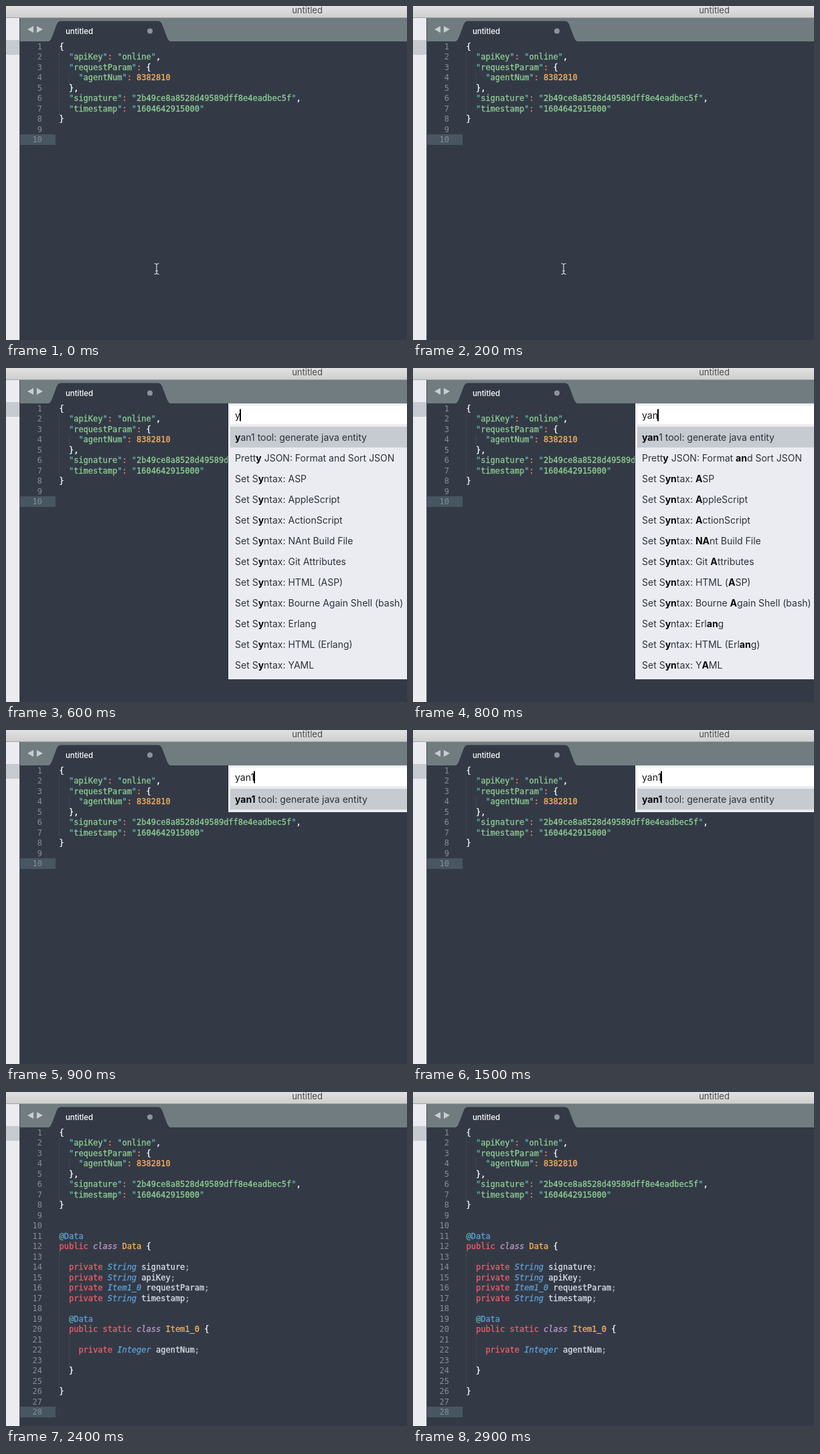
An HTML page with a canvas for the animation above (3 s loop, 599 px wide and 500 px high).

```html
<!DOCTYPE html>
<html lang="en">
<head>
<meta charset="utf-8">
<title>Editor</title>
<style>
  html, body { margin: 0; width: 100%; height: 100%; overflow: hidden; background: #333a46; }
  canvas { display: block; }
</style>
</head>
<body>
<canvas id="stage" width="599" height="500"></canvas>
<script>
const ctx = document.getElementById('stage').getContext('2d');

const LOOP = 3000, STEP = 100;
const OPEN_AT = 300, RESULT_AT = 1700;
const TYPING = [[600, 'y'], [700, 'ya'], [800, 'yan'], [900, 'yan1']];
const POINTER = { start: 1800, end: 2200, path: [[225, 393.5], [554, 459], [534, 497]] };

const CODE_SIZE = 12, CODE_X = 79.5, LINE_H = 15.5, FIRST_LINE = 61;
const MONO = '"DejaVu Sans Mono", monospace';
const SANS = 'Inter, sans-serif';
const ROW_H = 31, LIST_X = 342;

const C = {
  editor: '#333a46', side: '#ebecf1', selected: '#c6cad1', tabs: '#707c80',
  gutter: '#475661', number: '#868d97', guide: '#4b5460', text: '#dce1e9',
  white: '#ffffff', green: '#8fce94', teal: '#5fb4b4', coral: '#f0785c',
  orange: '#f9ae58', red: '#ef5c68', blue: '#5f9fd6', purple: '#c695c6', punct: '#a6acb9'
};

const json = `{
  "apiKey": "online",
  "requestParam": {
    "agentNum": 8382810
  },
  "signature": "2b49ce8a8528d49589dff8e4eadbec5f",
  "timestamp": "1604642915000"
}

`.split('\n');

const java = `@Data
public class Data {

  private String signature;
  private String apiKey;
  private Item1_0 requestParam;
  private String timestamp;

  @Data
  public static class Item1_0 {

    private Integer agentNum;

  }

}

`.split('\n');

const fullDoc = [...json, ...java];

const commands = ['About', 'Anaconda: Vagrant Enable', 'Anaconda: Vagrant Init',
  'Anaconda: Vagrant Reload', 'Anaconda: Vagrant Status', 'Anaconda: Vagrant Up',
  'Arithmetic', 'Bookmarks: Clear All', 'Bookmarks: Select All',
  'Bookmarks: Select Next', 'Bookmarks: Select Previous', 'Bookmarks: Toggle'];

// Asterisks enclose the letters that can match the query.
const matches = ['*yan1* tool: generate java entity', 'Prett*y* JSON: Format *an*d Sort JSON',
  ...['*A*SP', '*A*ppleScript', '*A*ctionScript', '*NA*nt Build File', 'Git *A*ttributes',
    'HTML (*A*SP)', 'Bourne *A*gain Shell (bash)', 'Erl*an*g', 'HTML (Erl*an*g)', 'Y*A*ML']
    .map(name => `Set S${name.includes('*an*') ? '*y*n' : '*yn*'}tax: ${name}`)];

const syntax = [
  [/\w+(?=")/y, C.green], [/"/y, C.teal], [/:/y, C.coral], [/\d+/y, C.orange],
  [/(Data|Item1_0)(?= \{)/y, C.orange], [/@/y, C.teal], [/Data/y, C.blue],
  [/String|Integer|Item1_0/y, C.blue, true], [/class/y, C.purple, true],
  [/private|public|static/y, C.red], [/;/y, C.punct], [/[{},]/y, C.white],
  [/\w+|./y, C.text]
];

function rect(x, y, w, h, color) {
  ctx.fillStyle = color;
  ctx.fillRect(x, y, w, h);
}

function shape(points, color) {
  ctx.fillStyle = color;
  ctx.beginPath();
  points.forEach(([x, y]) => ctx.lineTo(x, y));
  ctx.fill();
}

function label(str, x, y, font, color, align = 'left') {
  ctx.font = font;
  ctx.textAlign = align;
  ctx.fillStyle = color;
  ctx.fillText(str, x, y);
}

const lineY = n => FIRST_LINE + (n - 1) * LINE_H;

function codeLine(str, baseline) {
  ctx.font = `${CODE_SIZE}px ${MONO}`;
  ctx.lineWidth = 0.3;
  const charW = ctx.measureText('0').width;
  for (let i = 0; i < str.length;) {
    for (const [pattern, color, italic] of syntax) {
      pattern.lastIndex = i;
      const hit = pattern.exec(str);
      if (!hit) continue;
      const x = CODE_X + i * charW;
      label(hit[0], x, baseline, `${italic ? 'italic ' : ''}${CODE_SIZE}px ${MONO}`, color);
      ctx.strokeStyle = color;
      ctx.strokeText(hit[0], x, baseline);
      i += hit[0].length;
      break;
    }
  }
}

function guide(x, from, to) {
  const bottom = lineY(to) + LINE_H / 2;
  for (let y = Math.round(lineY(from) - LINE_H / 2); y < bottom; y += 2) rect(x, y, 1, 1, C.guide);
}

function drawWindow() {
  rect(0, 0, 599, 500, C.editor);
  rect(0, 17, 20, 483, C.side);
  rect(0, 51, 20, 22, C.selected);
  rect(20, 17, 1, 483, '#4c525c');

  const bar = ctx.createLinearGradient(0, 0, 0, 17);
  bar.addColorStop(0, '#e2e1e2');
  bar.addColorStop(1, '#d0cfd0');
  rect(0, 0, 599, 17, bar);
  label('untitled', 450, 11, `13px ${SANS}`, '#4a4a4b', 'center');

  rect(21, 17, 578, 36, C.tabs);
  rect(0, 17, 599, 1, '#a0a4a5');
  ctx.fillStyle = C.editor;
  ctx.beginPath();
  ctx.moveTo(64, 53);
  ctx.quadraticCurveTo(67, 51, 68.5, 47);
  ctx.lineTo(76, 27);
  ctx.quadraticCurveTo(78, 22.5, 82, 22.5);
  ctx.lineTo(227, 22.5);
  ctx.quadraticCurveTo(231, 22.5, 233, 27);
  ctx.lineTo(240.5, 47);
  ctx.quadraticCurveTo(242, 51, 245, 53);
  ctx.fill();
  shape([[32, 35], [41, 30], [41, 40]], '#c8cdcf');
  shape([[55, 35], [46, 30], [46, 40]], '#c8cdcf');
  label('untitled', 89, 41.5, `500 11.4px ${SANS}`, C.white);
  ctx.fillStyle = '#8d939b';
  ctx.beginPath();
  ctx.arc(215, 37.5, 4, 0, Math.PI * 2);
  ctx.fill();
}

function drawDocument(t) {
  const done = t >= RESULT_AT;
  const lines = done ? fullDoc : json;
  const last = lines.length;
  const lastTop = Math.floor(lineY(last) - 8);
  rect(21, lastTop, 53, 16, C.gutter);
  guide(79, 2, 7);
  guide(94, 4, 4);
  if (done) {
    guide(79, 13, 25);
    guide(94, 21, 23);
    const pulse = Math.sin(Math.PI * (t - RESULT_AT) / 600) ** 2;
    ctx.globalAlpha = 0.22 * pulse;
    rect(79, lastTop, 1, 16, C.white);
    ctx.globalAlpha = 1;
  }
  lines.forEach((str, i) => {
    const baseline = Math.floor(lineY(i + 1) + 4.4);
    label(i + 1, 54, baseline, `${CODE_SIZE}px ${MONO}`, C.number, 'right');
    codeLine(str, baseline);
  });
}

function listText(str, baseline, query) {
  let x = LIST_X, marked = false;
  const runs = [];
  for (const ch of str) {
    if (ch === '*') { marked = !marked; continue; }
    const bold = marked && query.includes(ch.toLowerCase());
    const run = runs[runs.length - 1];
    if (run && run.bold === bold) run.text += ch;
    else runs.push({ text: ch, bold });
  }
  for (const { text, bold } of runs) {
    label(text, x, baseline, `${bold ? 700 : 400} 14px ${SANS}`, bold ? '#08090b' : '#2c323c');
    x += ctx.measureText(text).width;
  }
}

function drawPalette(query) {
  const rows = !query ? commands : query === 'yan1' ? matches.slice(0, 1) : matches;
  const height = rows.length > 1 ? 413 : 70;
  rect(331, 53, 1, height, '#22272f');
  rect(332, 53, 267, height, C.side);
  rect(335, 56, 264, 28, C.white);
  rect(335, 88, 264, ROW_H, C.selected);

  label(query, LIST_X, 75.5, `14px ${SANS}`, '#15171a');
  const caretX = query ? Math.round(LIST_X + ctx.measureText(query).width) - 1 : 341;
  rows.forEach((row, i) => listText(row, 108.5 + i * ROW_H, query));
  rect(caretX, 61.5, 2, 18, '#000');
}

function drawPointer(x, y) {
  ctx.strokeStyle = '#d3d7dc';
  ctx.lineWidth = 1.2;
  ctx.beginPath();
  for (const s of [-1, 1]) {
    ctx.moveTo(x - 3.5, y + s * 8);
    ctx.quadraticCurveTo(x, y + s * 8, x, y + s * 5.5);
    ctx.quadraticCurveTo(x, y + s * 8, x + 3.5, y + s * 8);
  }
  ctx.moveTo(x, y - 6);
  ctx.lineTo(x, y + 6);
  ctx.moveTo(x - 2, y + 3);
  ctx.lineTo(x + 2, y + 3);
  ctx.stroke();
}

function pointerAt(t) {
  const p = (t - POINTER.start) / (POINTER.end - POINTER.start), q = 1 - p;
  const [a, b, c] = POINTER.path;
  return [0, 1].map(k => q * q * a[k] + 2 * p * q * b[k] + p * p * c[k]);
}

function drawScene(t) {
  drawWindow();
  drawDocument(t);
  if (t >= OPEN_AT && t < RESULT_AT) {
    const typed = TYPING.filter(([at]) => t >= at).pop();
    drawPalette(typed ? typed[1] : '');
  }
  // The pointer hides while typing and returns when it moves.
  if (t < TYPING[0][0]) drawPointer(...POINTER.path[0]);
  else if (t >= POINTER.start && t <= POINTER.end) drawPointer(...pointerAt(t));
}

function frame() {
  const t = performance.now() % LOOP;
  drawScene(Math.floor(t / STEP) * STEP);
  requestAnimationFrame(frame);
}
frame();
</script>
</body>
</html>
```
